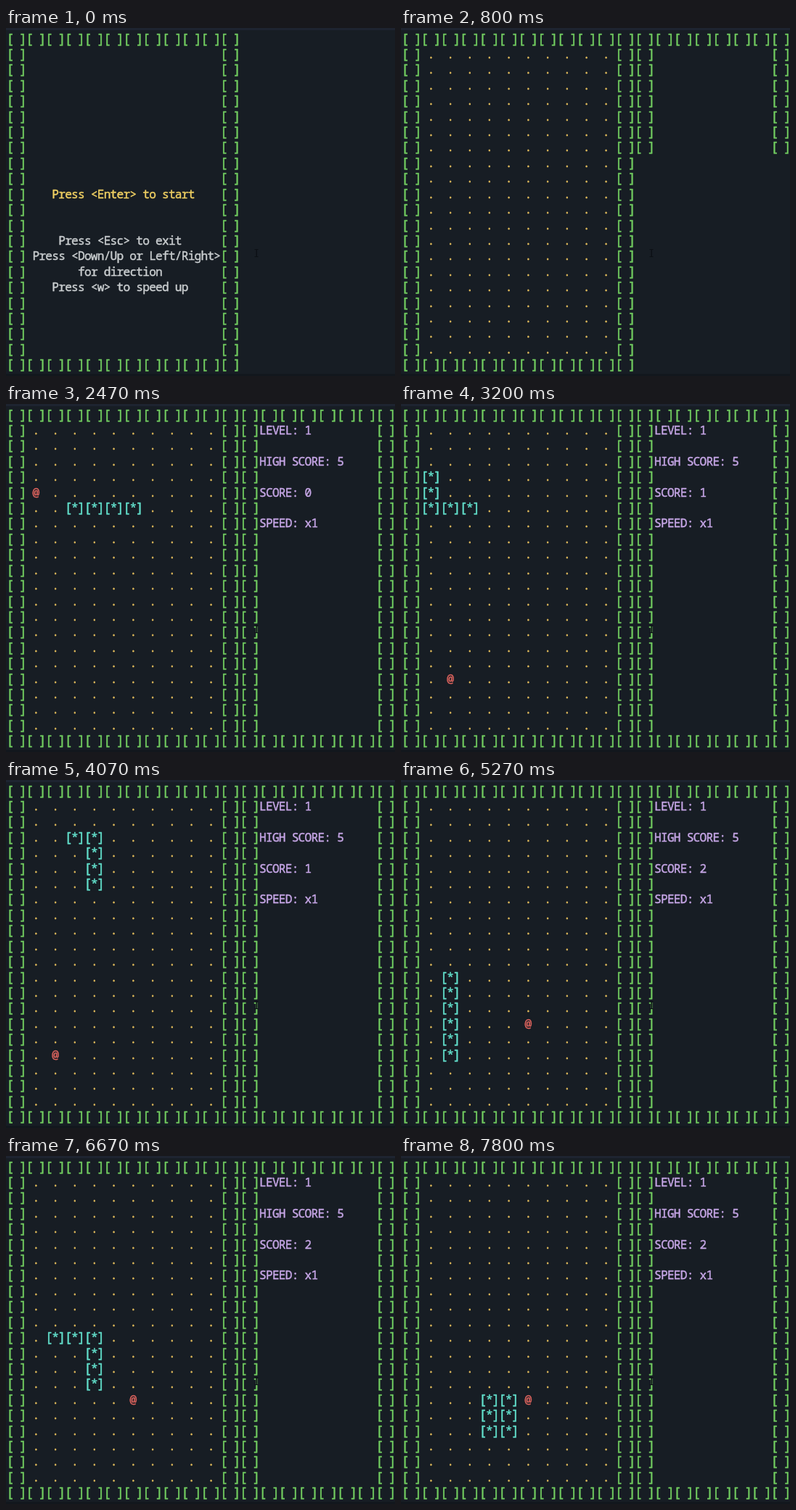
Animation, 536 px wide and 480 px high, one loop 8000 ms. Source, as an HTML page with a canvas:

```html
<!DOCTYPE html>
<html lang="en">
<head>
<meta charset="utf-8">
<title>Terminal snake</title>
<style>
html, body { margin: 0; width: 100%; height: 100%; overflow: hidden; background: #171d24; }
canvas { display: block; width: 536px; height: 480px; }
</style>
</head>
<body>
<canvas id="stage" width="536" height="480"></canvas>
<script>
const ctx = document.getElementById('stage').getContext('2d');
const LOOP = 8000;
const CHAR = 8.93, ROW = 21.42, LEFT = 1.2, BASE = 20.5;
const TEXT_SIZE = 16.2, BRACKET_SIZE = 18.4, ADVANCE = 0.6;
const LAST_ROW = 21, BOARD_RIGHT = 11, PANEL_LEFT = 12, PANEL_RIGHT = 19;
const COLOR = {
  back: '#171d24', wall: '#72cd60', dot: '#e3bd5c', snake: '#62dfcb',
  food: '#e0655f', info: '#c6a6e6', title: '#efcf62', help: '#c9cdcf'
};

// Corners of the snake's route, as [cell, row]
const corners = [[6, 13], [6, 6], [1, 6], [1, 3], [4, 3], [4, 11], [2, 11],
  [2, 17], [1, 17], [1, 11], [4, 11], [4, 17], [5, 17], [5, 15]];
// [time, index of the head on the route]
const pace = [[1200, 3], [1330, 4], [2270, 9], [2470, 10], [3200, 14], [3470, 15],
  [4070, 21], [4200, 22], [4470, 25], [4600, 26], [5270, 34], [5400, 35],
  [5530, 36], [5670, 37], [6670, 47], [6800, 48], [7800, 53]];
const foods = [[1, 5], [2, 17], [6, 15]];
const meals = [13, 34];

const route = [corners[0]];
for (const [cx, cy] of corners.slice(1)) {
  let [x, y] = route[route.length - 1];
  while (x !== cx || y !== cy) {
    x += Math.sign(cx - x);
    y += Math.sign(cy - y);
    route.push([x, y]);
  }
}

function headAt(t) {
  for (let i = 1; i < pace.length; i++) {
    const [t0, h0] = pace[i - 1], [t1, h1] = pace[i];
    if (t < t1) return Math.floor(h0 + (h1 - h0) * (t - t0) / (t1 - t0) + 1e-6);
  }
  return pace[pace.length - 1][1];
}

// Tight letter spacing keeps tall glyphs on the terminal's character grid
function setFont(size) {
  ctx.font = size + 'px "Noto Sans Mono", monospace';
  ctx.letterSpacing = (CHAR - size * ADVANCE) + 'px';
}

function print(text, col, row, color, size = TEXT_SIZE) {
  setFont(size);
  const x = LEFT + col * CHAR - (size * ADVANCE - CHAR) / 2;
  const y = BASE + row * ROW;
  ctx.fillStyle = ctx.strokeStyle = color;
  ctx.fillText(text, x, y);
  ctx.strokeText(text, x, y);
}

function brackets(x, y, color) {
  print('[ ]', x * 3, y, color, BRACKET_SIZE);
}

function mark(sign, x, y, color) {
  ctx.fillStyle = COLOR.back;
  ctx.fillRect(LEFT + (x * 3 + 1) * CHAR, BASE + y * ROW - 14, CHAR, 18);
  print(sign, x * 3 + 1, y, color);
}

function wallRows(from, to, count) {
  for (let y = 0; y < count; y++) {
    const solid = y === 0 || y === LAST_ROW;
    for (let x = from; x <= to; x++) {
      if (solid || x === from || x === to) brackets(x, y, COLOR.wall);
    }
  }
}

function drawMenu() {
  wallRows(0, BOARD_RIGHT, LAST_ROW + 1);
  print('Press <Enter> to start', 7, 10, COLOR.title);
  print('Press <Esc> to exit', 8, 13, COLOR.help);
  print('Press <Down/Up or Left/Right>', 4, 14, COLOR.help);
  print('for direction', 11, 15, COLOR.help);
  print('Press <w> to speed up', 7, 16, COLOR.help);
}

function drawBoard(rows) {
  wallRows(0, BOARD_RIGHT, rows);
  for (let y = 1; y < Math.min(rows, LAST_ROW); y++) {
    for (let x = 1; x < BOARD_RIGHT; x++) print('.', x * 3 + 1, y, COLOR.dot);
  }
}

function drawInfo(score) {
  ['LEVEL: 1', 'HIGH SCORE: 5', 'SCORE: ' + score, 'SPEED: x1']
    .forEach((line, i) => print(line, 39, 1 + i * 2, COLOR.info));
}

function drawSnake(head, score) {
  mark('@', ...foods[score], COLOR.food);
  if (head < 0) return;
  for (let i = head; i > head - 4 - score; i--) {
    mark('*', ...route[i], COLOR.snake);
    brackets(...route[i], COLOR.snake);
  }
}

function drawGame(t) {
  const step = Math.floor((t - 200) / 100);
  const rows = n => Math.max(0, Math.min(LAST_ROW + 1, n));
  drawBoard(rows(Math.ceil(step * 4.4)));
  wallRows(PANEL_LEFT, PANEL_RIGHT, rows(Math.ceil((step - 5) * 7.4)));
  if (step < 9) return;
  const head = t < 1200 ? -1 : headAt(t);
  const score = meals.filter(m => head >= m).length;
  drawInfo(score);
  drawSnake(head, score);
}

// Dim mouse pointer left lying on the terminal
function drawPointer(x, y) {
  ctx.fillStyle = '#0c1015';
  ctx.fillRect(x, y, 1.5, 11);
  ctx.fillRect(x - 2, y, 5, 1);
  ctx.fillRect(x - 2, y + 10, 5, 1);
}

function draw(t) {
  ctx.fillStyle = COLOR.back;
  ctx.fillRect(0, 0, 536, 480);
  ctx.fillStyle = '#1e2430';
  ctx.fillRect(0, 0, 536, 3);
  ctx.fillStyle = '#12171d';
  ctx.fillRect(0, 477, 536, 3);
  ctx.textBaseline = 'alphabetic';
  ctx.lineJoin = 'round';
  ctx.lineWidth = 0.45;
  if (t < 200) drawMenu();
  else drawGame(t);
  drawPointer(344.5, 305);
}

const start = performance.now();
function tick() {
  draw((performance.now() - start) % LOOP);
  requestAnimationFrame(tick);
}
tick();
</script>
</body>
</html>
```
